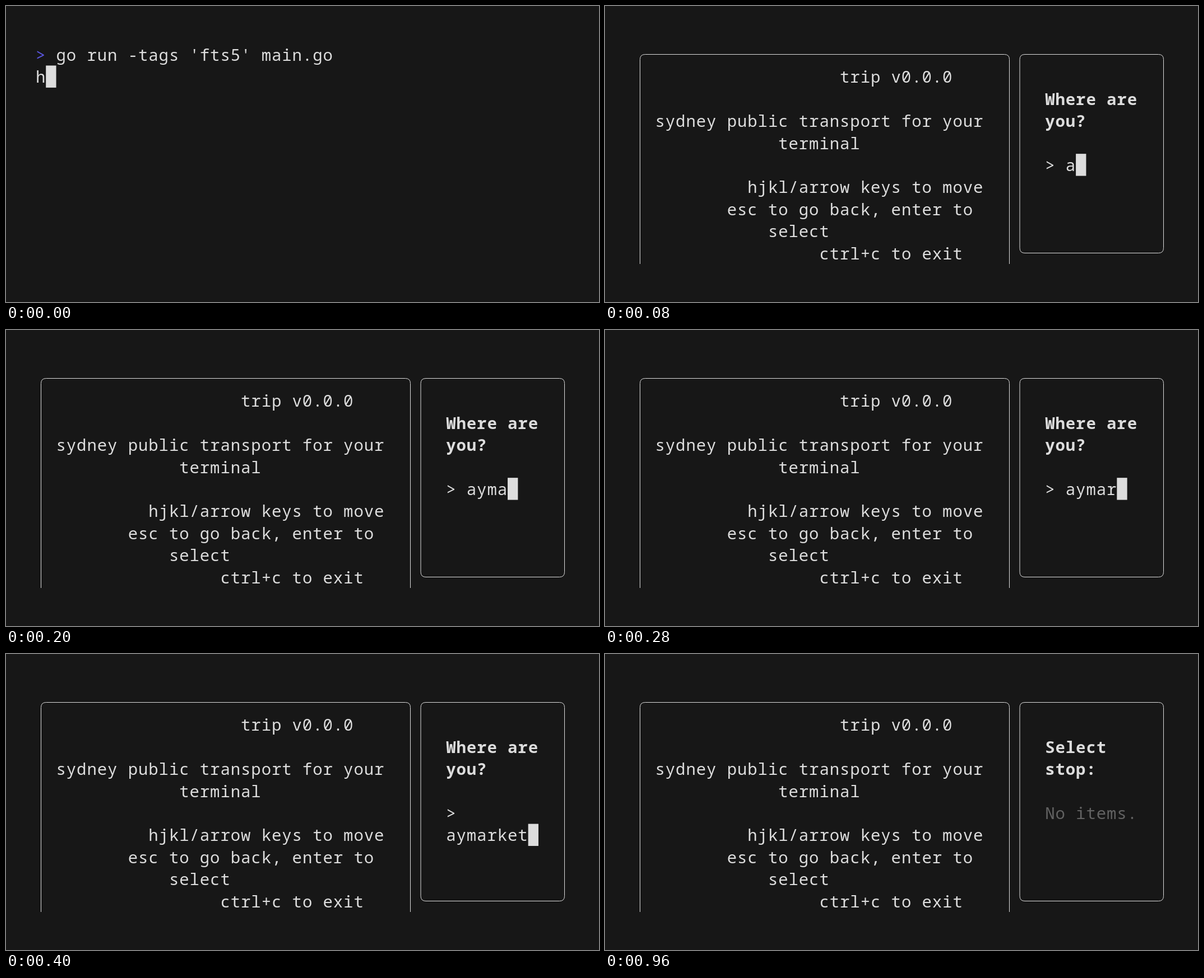
An HTML page that plays this animation: 1058x529 px, repeating every 8000 ms.

```html
<!DOCTYPE html>
<html lang="en">
<head>
<meta charset="utf-8">
<title>Terminal session</title>
<style>
  html, body { margin: 0; width: 100%; height: 100%; overflow: hidden; background: #171717; }
  svg { display: block; width: 100vw; height: 100vh; }
  text { font-family: "Noto Sans Mono", "DejaVu Sans Mono", monospace; white-space: pre; }
</style>
</head>
<body>
<svg id="stage" viewBox="0 0 1058 529"></svg>
<script>
const NS = "http://www.w3.org/2000/svg";
const LOOP = 8000;
const LEFT = 52.9, TOP = 67, CELL = 18.307, ROW = 39.43;
const FONT = 29, BASELINE = 30.9;
const FG = "#dddddd", DIM = "#626262", PROMPT = "#5a56e0";

const stage = document.getElementById("stage");
const colX = col => LEFT + col * CELL;
const rowY = row => TOP + row * ROW;

function add(parent, tag, attrs) {
  const el = document.createElementNS(NS, tag);
  for (const name in attrs) el.setAttribute(name, attrs[name]);
  parent.appendChild(el);
  return el;
}

function write(parent, col, row, content, attrs = {}) {
  const el = add(parent, "text", {
    x: colX(col), y: rowY(row) + BASELINE, fill: FG, "font-size": FONT,
    "letter-spacing": CELL - FONT * 0.6, ...attrs
  });
  el.textContent = content;
  return el;
}

function line(parent, d) {
  return add(parent, "path", { d, fill: "none", stroke: FG, "stroke-width": 1 });
}

function show(el, visible) {
  el.setAttribute("visibility", visible ? "inherit" : "hidden");
}

add(stage, "rect", { width: 1058, height: 529, fill: "#171717" });

// Shell
const shell = add(stage, "g");
write(shell, 0, 0, ">", { fill: PROMPT });
write(shell, 2, 0, "go run -tags 'fts5' main.go");
write(shell, 0, 1, "h");

// Help panel
const app = add(stage, "g");
line(app, "M62.5 461V95.5Q62.5 86.5 71.5 86.5H712.5Q721.5 86.5 721.5 95.5V461");
[
  [20, 1, "trip v0.0.0"],
  [2, 3, "sydney public transport for your"],
  [14, 4, "terminal"],
  [11, 6, "hjkl/arrow keys to move"],
  [9, 7, "esc to go back, enter to"],
  [13, 8, "select"],
  [18, 9, "ctrl+c to exit"]
].forEach(([col, row, content]) => write(app, col, row, content));

// Side panel; its right edge is pushed off screen when the input overflows
const leftEdge = "M{x} 86.5H749Q740 86.5 740 95.5V432.5Q740 441.5 749 441.5H{x}";
const openBox = line(app, leftEdge.replaceAll("{x}", 1005));
const closedBox = line(app, leftEdge.replaceAll("{x}", 987.5) +
  "Q996.5 441.5 996.5 432.5V95.5Q996.5 86.5 987.5 86.5");
const bold = { "font-weight": 700 };
const title = [write(app, 40, 2, "", bold), write(app, 40, 3, "", bold)];
const mark = write(app, 40, 5, ">");
const input = write(app, 42, 5, "");
const empty = write(app, 40, 5, "No items.", { fill: DIM });

const cursor = add(stage, "rect", { width: CELL, height: ROW, fill: FG });

function moveCursor(col, row) {
  cursor.setAttribute("x", colX(col));
  cursor.setAttribute("y", rowY(row));
}

// One key per 40 ms tick, with one tick skipped at 240 ms
function typedCount(t) {
  const tick = Math.floor(t / 40);
  return Math.max(0, Math.min(8, tick - (tick >= 6 ? 2 : 1)));
}

function render(t) {
  const started = t >= 40;
  const listing = t >= 960;
  const count = typedCount(t);
  const wrapped = count === 8;
  const overflow = count === 7;

  show(shell, !started);
  show(app, started);
  show(openBox, overflow);
  show(closedBox, !overflow);
  show(mark, !listing);
  show(input, !listing);
  show(empty, listing);
  show(cursor, t < 920);

  title[0].textContent = listing ? "Select" : "Where are";
  title[1].textContent = listing ? "stop:" : "you?";

  const col = wrapped ? 40 : 42, row = wrapped ? 6 : 5;
  input.textContent = "aymarket".slice(0, count);
  input.setAttribute("x", colX(col));
  input.setAttribute("y", rowY(row) + BASELINE);
  if (started) moveCursor(col + count, row);
  else moveCursor(1, 1);
}

const start = performance.now();
function frame() {
  render((performance.now() - start) % LOOP);
  requestAnimationFrame(frame);
}
render(0);
requestAnimationFrame(frame);
</script>
</body>
</html>
```
